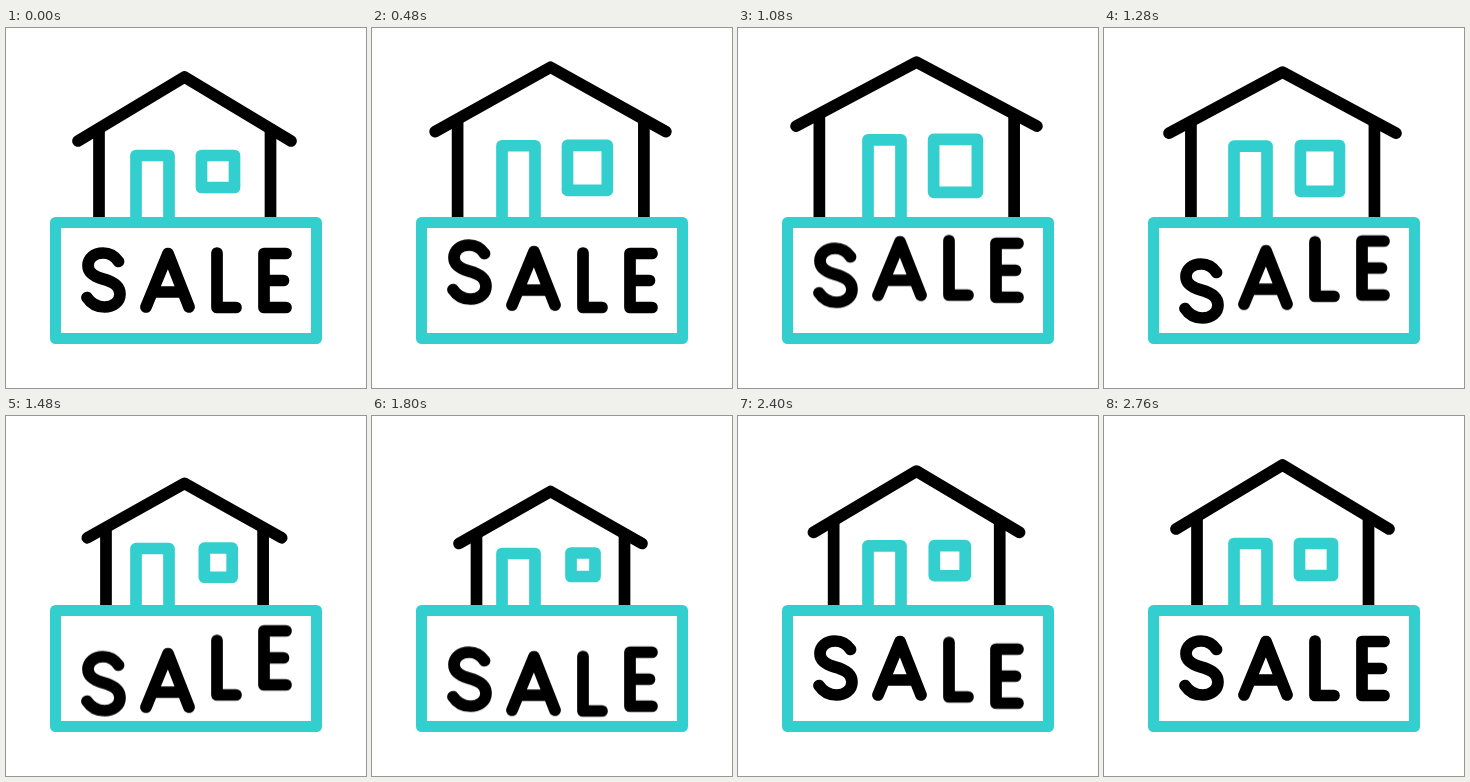
Recreate the animation shown at these times as an HTML page. Size 360x360 px, loop 3000 ms.

```html
<!DOCTYPE html>
<html lang="en">
<head>
<meta charset="utf-8">
<title>House sale</title>
<style>
  html, body { margin: 0; width: 100%; height: 100%; overflow: hidden; background: #fff; }
  svg { display: block; width: 100vw; height: 100vh; }
  path, rect { fill: none; stroke: #000; stroke-width: 11.7; stroke-linecap: round; stroke-linejoin: round; }
  .teal { stroke: #32cfce; }
  .board { fill: #fff; stroke-width: 11; }

  .house > * { animation: 3s cubic-bezier(.67, 0, .33, 1) infinite; }
  .house .roof { animation-name: roof; }
  .house .walls { animation-name: walls; }
  .house .door { animation-name: door; }
  .house .window { animation-name: window; }

  @keyframes roof {
    0%, 92.7%, 100% { d: path("M72 113 L178.5 49 L285 113"); }
    30.2% { d: path("M57 97 L178.5 32.5 L300 97"); }
    60.5% { d: path("M87 127.5 L178.5 75.5 L270 127.5"); }
  }
  @keyframes walls {
    0%, 92.7%, 100% { d: path("M93 101 L93 195 M264.5 101 L264.5 195"); }
    30.2% { d: path("M80.5 86 L80.5 195 M277 86 L277 195"); }
    60.5% { d: path("M104.5 118 L104.5 195 M252.5 118 L252.5 195"); }
  }
  @keyframes door {
    0%, 92.7%, 100% { d: path("M130 195 L130 127.5 L163 127.5 L163 195"); }
    30.2% { d: path("M130 195 L130 111 L163 111 L163 195"); }
    60.5% { d: path("M130 195 L130 137.5 L163 137.5 L163 195"); }
  }
  @keyframes window {
    0%, 92.7%, 100% { d: path("M195.5 127.5 L228.5 127.5 L228.5 159.5 L195.5 159.5 Z"); }
    30.2% { d: path("M195.5 110.5 L240 110.5 L240 164.5 L195.5 164.5 Z"); }
    60.5% { d: path("M199 137 L223 137 L223 160.5 L199 160.5 Z"); }
  }

  .word path { animation: hop 3s calc(80ms + 175ms * var(--i)) cubic-bezier(.57, 0, .43, 1) infinite; }
  @keyframes hop {
    0%, 71.7%, 100% { transform: translateY(0); }
    23.9% { transform: translateY(-12.5px); }
    47.8% { transform: translateY(15.7px); }
  }
</style>
</head>
<body>
<svg viewBox="0 0 360 360">
  <g class="house">
    <path class="walls" d="M93 101 L93 195 M264.5 101 L264.5 195"/>
    <path class="roof" d="M72 113 L178.5 49 L285 113"/>
    <path class="door teal" d="M130 195 L130 127.5 L163 127.5 L163 195"/>
    <path class="window teal" d="M195.5 127.5 L228.5 127.5 L228.5 159.5 L195.5 159.5 Z"/>
  </g>
  <rect class="board teal" x="49.5" y="194.5" width="261" height="116"/>
  <g class="word" role="img" aria-label="SALE">
    <path style="--i:0" d="M112.5 233.5 C108.5 227.5 103 225 97 225 C88 225 82 230.5 82 237.5 C82 245 88 248.5 97 251 C108 254 114 258 114 266 C114 274 107 279 98.5 279 C91 279 85 275.5 81 269.5"/>
    <path style="--i:1" d="M140 279 L162 225.5 L183 279 M147 264 H176"/>
    <path style="--i:2" d="M211 225 V279.5 H230"/>
    <path style="--i:3" d="M280 225.5 H258 V279.5 H280 M258 252.5 H277.5"/>
  </g>
</svg>
</body>
</html>
```
